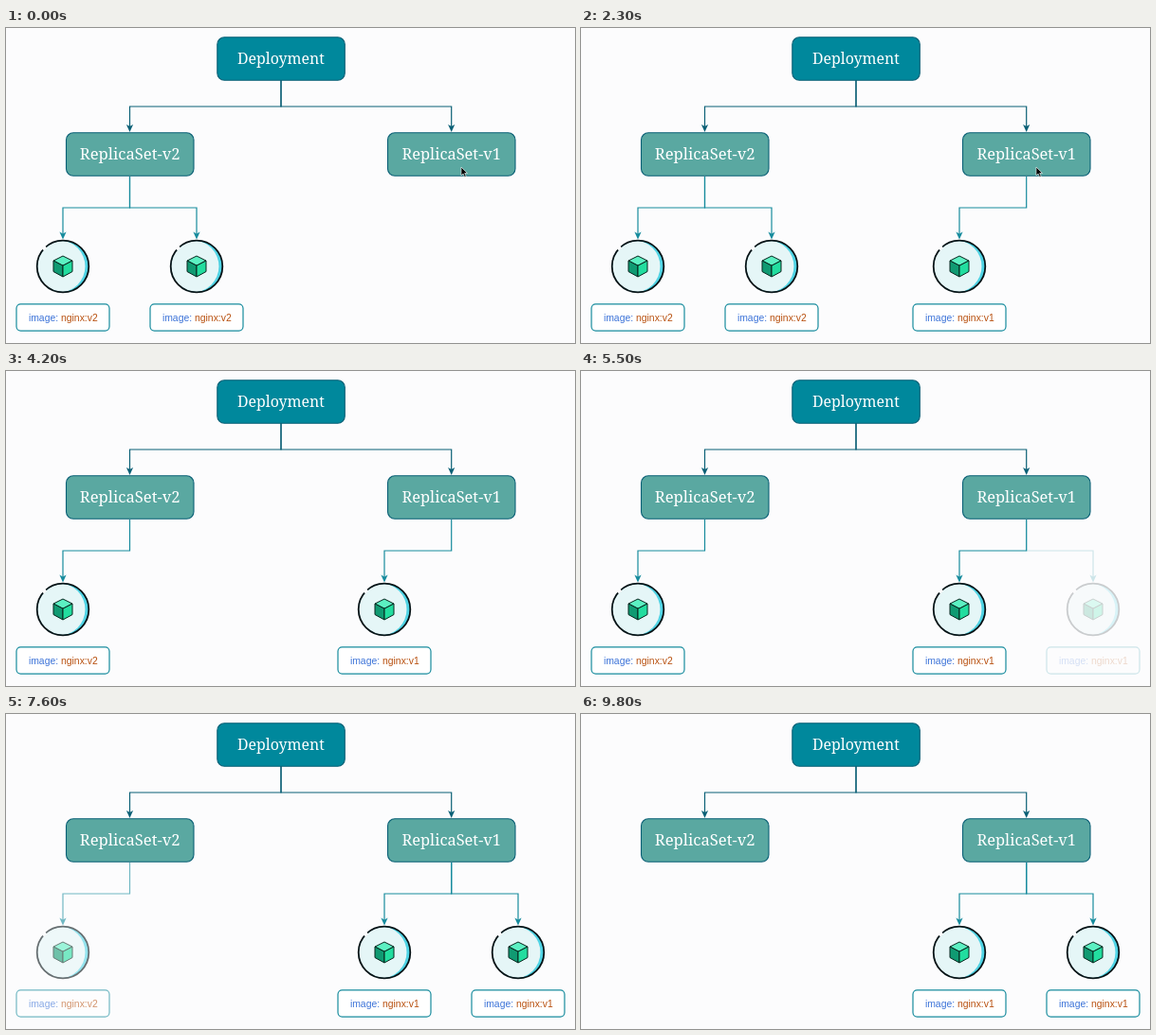
Recreate the animation shown at these times as an HTML page. Size 600x333 px, loop 9.9 s.

```html
<!DOCTYPE html>
<html lang="en">
<head>
<meta charset="utf-8">
<title>Rollback of a deployment</title>
<style>
  html, body { margin: 0; width: 100%; height: 100%; overflow: hidden; background: #fcfcfd; }
  svg { display: block; width: 100vw; height: 100vh; }
  text { text-anchor: middle; }
  .title { font-family: "Noto Serif", "Liberation Serif", serif; fill: #fff; }
  .label { font: 10.4px "Liberation Sans", Arial, sans-serif; fill: #3c73d8; }
  .label .value { fill: #b8500f; }
  .wire { fill: none; stroke-width: 1.2; }
</style>
</head>
<body>
<svg id="stage" viewBox="0 0 600 333">
  <defs>
    <clipPath id="disc"><circle r="27"/></clipPath>
    <g id="icon">
      <circle r="27.5" fill="#4fd3e4"/>
      <g clip-path="url(#disc)"><circle cx="-4" r="27.5" fill="#e5f6f7"/></g>
      <circle r="27.3" fill="none" stroke="#071316" stroke-width="1.8"/>
      <path d="M-20.9 -17.6A27.3 27.3 0 0 1 -17.9 -20.6" fill="none" stroke="#fcfcfd" stroke-width="3"/>
      <g stroke="#06251d" stroke-width="1" stroke-linejoin="round">
        <path d="M0 -11L10 -6L0 -.8L-10 -6Z" fill="#5cf0c2"/>
        <path d="M-10 -6L0 -.8V11L-10 5.5Z" fill="#109a72"/>
        <path d="M10 -6L0 -.8V11L10 5.5Z" fill="#22dd9f"/>
      </g>
    </g>
  </defs>
</svg>
<script>
const LOOP = 9900, FADE = 1000, CURSOR_OFF = 3700;
const NAVY = '#0b6076', TEAL = '#168b9d';
const stage = document.getElementById('stage');

function add(parent, tag, attrs, text) {
  const el = document.createElementNS('http://www.w3.org/2000/svg', tag);
  for (const key in attrs) el.setAttribute(key, attrs[key]);
  if (text) el.textContent = text;
  parent.appendChild(el);
  return el;
}

// Elbow connector ending in a stealth arrowhead
function wire(parent, x1, y1, bend, x2, y2, color) {
  add(parent, 'path', { class: 'wire', stroke: color, d: `M${x1} ${y1}V${bend}H${x2}V${y2 - 5}` });
  add(parent, 'path', { fill: color, d: `M${x2} ${y2}l-3.6 -8l3.6 2l3.6 -2z` });
}

function box(x, y, fill, name, size) {
  add(stage, 'rect', { x, y, width: 134.5, height: 45.5, rx: 7.5, fill, stroke: NAVY, 'stroke-width': 1.1 });
  add(stage, 'text', { class: 'title', x: x + 67.2, y: y + 28.3, 'font-size': size }, name);
}

function pod(x, trunk, version) {
  const g = add(stage, 'g', {});
  wire(g, trunk, 157, 190, x, 223.5, TEAL);
  add(g, 'use', { href: '#icon', transform: `translate(${x} 252)` });
  add(g, 'rect', { x: x - 49, y: 291.8, width: 98, height: 28.3, rx: 4.5, fill: '#fff', stroke: TEAL, 'stroke-width': 1.2 });
  const label = add(g, 'text', { class: 'label', x: x + .3, y: 309.7 });
  add(label, 'tspan', {}, 'image: ');
  add(label, 'tspan', { class: 'value' }, 'nginx:' + version);
  return g;
}

// Fades in ten hard steps, then holds until the loop restarts
function fade(el, start, from, to, length = FADE) {
  el.animate([
    { opacity: from, offset: 0 },
    { opacity: from, offset: start / LOOP, easing: `steps(${length / 100}, end)` },
    { opacity: to, offset: (start + length) / LOOP },
    { opacity: to, offset: 1 }
  ], { duration: LOOP, iterations: Infinity });
}

wire(stage, 290, 55, 83, 130.5, 110, NAVY);
wire(stage, 290, 55, 83, 469.7, 110, NAVY);

[
  [60, 130.5, 'v2', 7200, 1, 0],
  [201, 130.5, 'v2', 2700, 1, 0],
  [399, 469.7, 'v1', 1300, 0, 1],
  [540, 469.7, 'v1', 5300, 0, 1]
].forEach(([x, trunk, version, start, from, to]) =>
  fade(pod(x, trunk, version), start, from, to));

box(222.8, 9.8, '#00889c', 'Deployment', 15.9);
box(63.5, 110.8, '#5aa8a1', 'ReplicaSet-v2', 16.6);
box(402.5, 110.8, '#5aa8a1', 'ReplicaSet-v1', 16.4);

const cursor = add(stage, 'path', {
  d: 'M480 147v9l2.1 -1.9l1.5 3.4l1.6 -.7l-1.5 -3.3h2.8z',
  fill: '#000', stroke: '#fff', 'stroke-width': .6
});
fade(cursor, CURSOR_OFF, 1, 0, 100);
</script>
</body>
</html>
```
